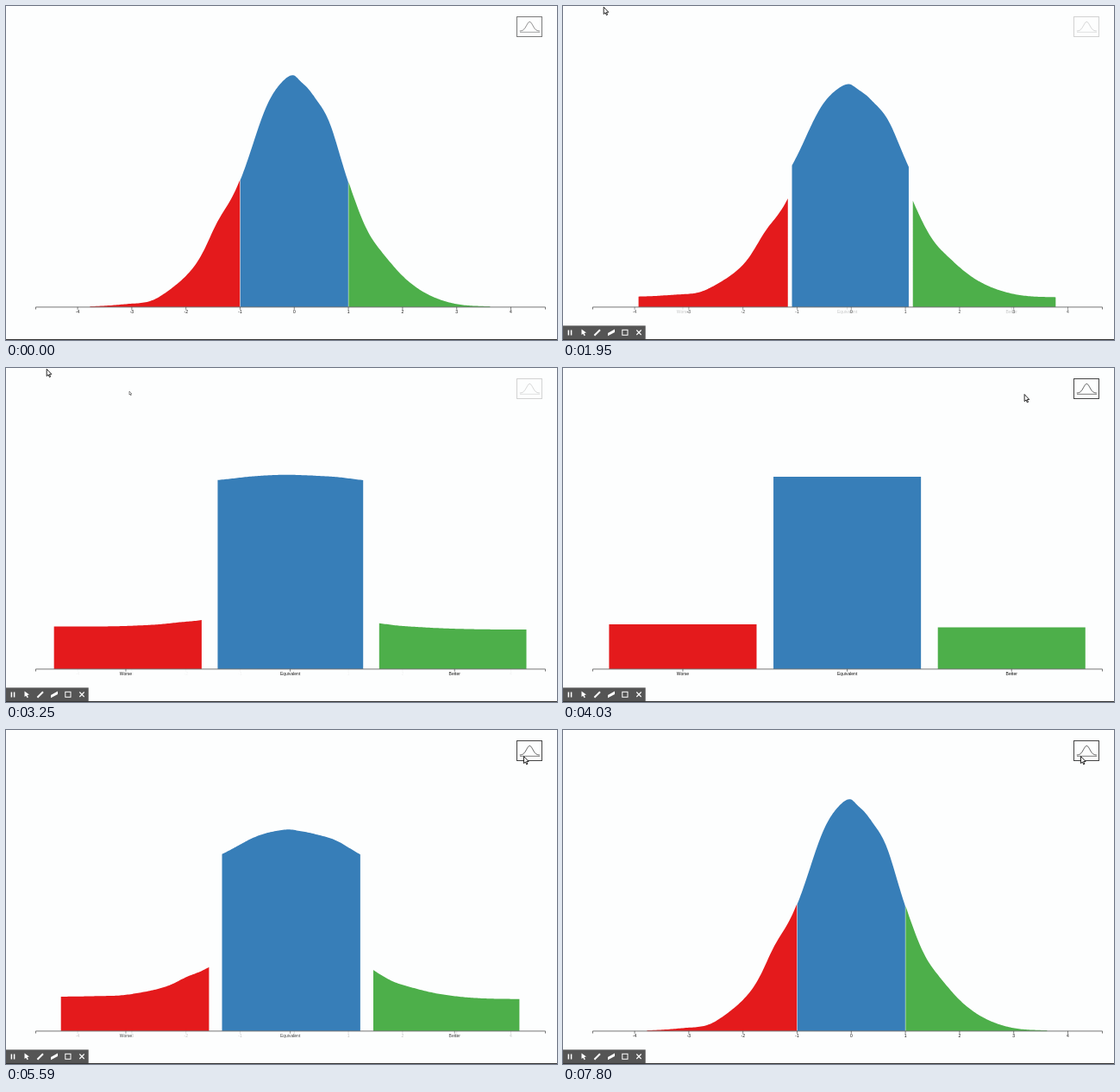
Write an HTML page with a canvas that moves like this. It is 639 px wide and 387 px high and loops after 8000 ms.

```html
<!DOCTYPE html>
<html lang="en">
<head>
<meta charset="utf-8">
<title>Density to bars</title>
<style>
  html, body { margin: 0; width: 100%; height: 100%; overflow: hidden; background: #fdfefe; }
  canvas { display: block; }
</style>
</head>
<body>
<canvas id="stage" width="639" height="387"></canvas>
<script>
const ctx = document.getElementById('stage').getContext('2d');
const LOOP = 8000, STEP = 130;
const BASE = 348.8, LEFT = 34.5, RIGHT = 625.5;
const PEAK = 269, ZERO = 334.3, UNIT = 62.8;
const INK = '#333', WHITE = '#fff';

// Three bars in a band scale with 10 % padding
const bandStep = (RIGHT - LEFT) / 3.1, bandWidth = bandStep * .9;
const parts = [
  { label: 'Worse', color: '#e41a1c', from: -3.775, to: -1, height: 51.8 },
  { label: 'Equivalent', color: '#377eb8', from: -1, to: 1, height: 222.8 },
  { label: 'Better', color: '#4daf4a', from: 1, to: 3.62, height: 48.2 }
].map((part, i) => ({ ...part, barX: LEFT - .4 + bandStep * (i + .1) }));

// Bumps that make the bell uneven: amplitude, centre, spread
const bumps = [
  [12, -.53, .22], [14, .65, .17], [10.5, -1.42, .18], [-8, 1.33, .2],
  [-3.3, -2.65, .22], [-1.4, 3, .35], [-3.5, .12, .09]
];

function density(z) {
  const bell = PEAK * Math.exp(-.616 * Math.abs(z) ** 1.706);
  const uneven = bumps.reduce((sum, [amp, mid, s]) => sum + amp * Math.exp(-(((z - mid) / s) ** 2) / 2), 0);
  return Math.max(0, bell + uneven);
}

// Time and progress: to the bars, a rest, and back with a short stall
const morphKeys = [
  [680, 0], [1430, .28], [2470, .4855], [3900, 1], [4580, 1],
  [5850, .512], [5980, .512], [6110, .412], [7180, 0]
];
const pointerKeys = [[3250, 143], [4160, 600.5]];

const mix = (a, b, k) => a + (b - a) * k;
const easeInOutCubic = u => u < .5 ? 4 * u ** 3 : 1 - 4 * (1 - u) ** 3;

function track(keys, t) {
  const next = keys.findIndex(([time]) => time >= t);
  if (next === 0) return keys[0][1];
  if (next < 0) return keys[keys.length - 1][1];
  const [t0, a] = keys[next - 1], [t1, b] = keys[next];
  return mix(a, b, (t - t0) / (t1 - t0));
}

function trace(pts) {
  ctx.beginPath();
  pts.forEach(p => ctx.lineTo(...p));
}

function line(color, width, ...pts) {
  trace(pts);
  ctx.strokeStyle = color;
  ctx.lineWidth = width;
  ctx.stroke();
}

function polygon(color, ...pts) {
  trace(pts);
  ctx.closePath();
  ctx.fillStyle = color;
  ctx.fill();
}

function drawPart({ color, from, to, barX, height }, p) {
  const segments = 100, inset = .25;
  const pts = [];
  for (let i = 0; i <= segments; i++) {
    const k = i / segments, z = mix(from, to, k);
    const x = mix(ZERO + UNIT * z, barX + bandWidth * k, p) + inset * (1 - 2 * k);
    pts.push([x, BASE - mix(density(z), height, p)]);
  }
  polygon(color, [pts[0][0], BASE], ...pts, [pts[segments][0], BASE]);
}

function drawTick(x, label, alpha) {
  ctx.globalAlpha = alpha;
  line(INK, .6, [x, BASE], [x, BASE + 3]);
  ctx.fillStyle = '#111';
  ctx.fillText(label, x, 355.6);
  ctx.globalAlpha = 1;
}

function drawAxis(p) {
  ctx.font = '5px "Liberation Sans", Arial, sans-serif';
  ctx.textAlign = 'center';
  line('#555', .8, [LEFT, 351.5], [LEFT, 348.9], [RIGHT, 348.9], [RIGHT, 351.5]);
  for (let n = -4; n <= 4; n++) drawTick(ZERO + UNIT * n, String(n), 1 - p);
  for (const { label, barX } of parts) drawTick(barX + bandWidth / 2, label, p);
}

function drawButton(alpha) {
  const bell = [];
  for (let x = -11.5; x <= 11.5; x += .5) bell.push([607.3 + x, 29 - 10.7 * Math.exp(-x * x / 26)]);
  ctx.globalAlpha = alpha;
  line('#444', .9, ...bell);
  line('#444', .7, [596, 30.3], [619, 30.3]);
  ctx.lineWidth = 1;
  ctx.strokeRect(592.5, 12.5, 29, 23);
  ctx.globalAlpha = 1;
}

function drawPointer(x, y, scale = 1) {
  const shape = [[0, 0], [0, 8.2], [1.9, 6.5], [3.2, 9.4], [4.4, 8.9], [3.1, 6.1], [5.6, 6]];
  ctx.save();
  ctx.translate(x, y);
  ctx.scale(scale, scale);
  polygon(WHITE, ...shape);
  line('#111', .9, ...shape, shape[0]);
  ctx.restore();
}

function drawToolbar() {
  ctx.fillStyle = '#555';
  ctx.fillRect(0, 370.4, 95.7, 16);
  // pause, arrow, pencil, eraser, square, cross
  for (const x of [6.4, 9.6]) line(WHITE, 1.5, [x, 375.5], [x, 381.5]);
  polygon(WHITE, [21.5, 374.5], [21.5, 381], [23.2, 379.7], [24.6, 382.3], [25.9, 381.6], [24.6, 379], [27, 378.6]);
  line(WHITE, 2, [36.4, 381.8], [43, 375.2]);
  polygon(WHITE, [52, 379], [60, 374.5], [60, 378], [52, 382.3]);
  ctx.lineWidth = 1;
  ctx.strokeRect(68.8, 375.3, 6.2, 6);
  for (const d of [-2.7, 2.7]) line(WHITE, 1.1, [88 - d, 375.5], [88 + d, 381]);
}

function draw(time) {
  const t = Math.min(Math.floor(time / STEP) * STEP, 7800);
  const p = easeInOutCubic(track(morphKeys, t));

  ctx.fillStyle = '#fdfefe';
  ctx.fillRect(0, 0, 639, 387);
  parts.forEach(part => drawPart(part, p));
  drawAxis(p);
  drawButton(t < 910 ? .7 : t < 3900 ? .23 : 1);
  if (t >= 390) drawToolbar();
  ctx.fillStyle = INK;
  ctx.fillRect(0, 386, 639, 1);

  const leaving = t < 3380;
  if (t >= 390 && leaving) drawPointer(47.2, 1.2);
  if (t >= 3250) drawPointer(track(pointerKeys, t), leaving ? 27 : 30.5, leaving ? .5 : 1);
}

function frame() {
  draw(performance.now() % LOOP);
  requestAnimationFrame(frame);
}
frame();
</script>
</body>
</html>
```
